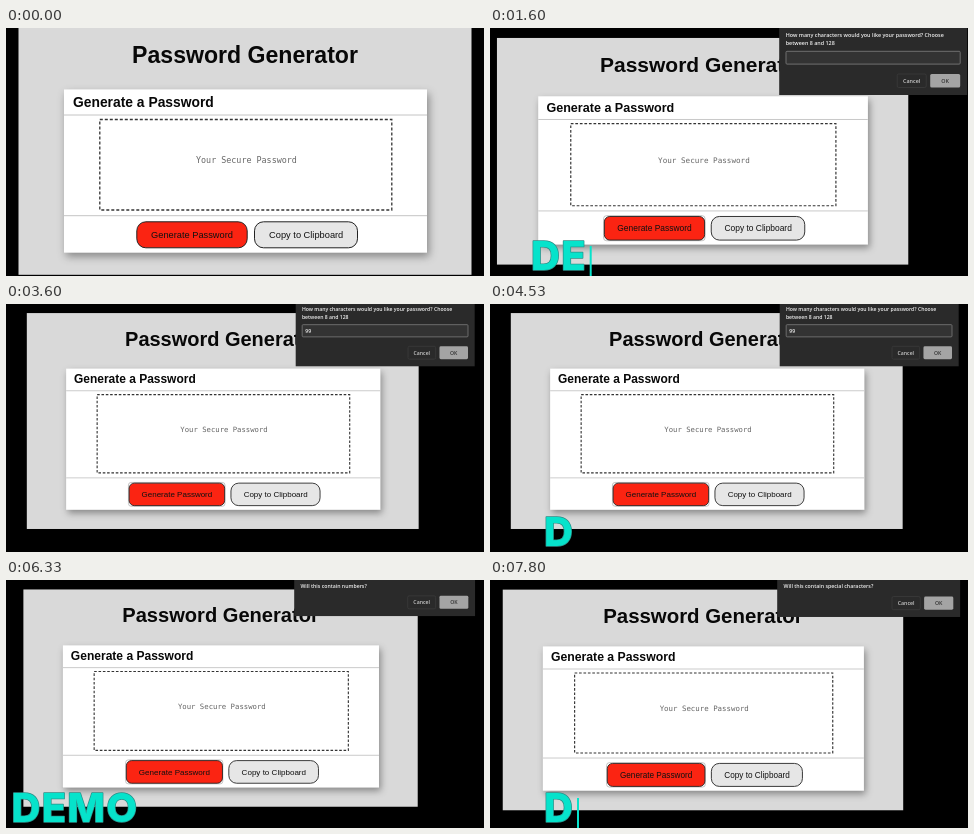
Animation of 478 by 248 pixels, one loop 8 s. Source, as an HTML page:

```html
<!DOCTYPE html>
<html lang="en">
<head>
<meta charset="utf-8">
<title>Password Generator demo</title>
<style>
  html, body { margin: 0; width: 100%; height: 100%; overflow: hidden; background: #000; }
  svg { display: block; width: 478px; height: 248px; }
  .sans { font-family: "Liberation Sans", Arial, sans-serif; }
  .mono { font-family: "DejaVu Sans Mono", monospace; }
  .ui { font: 600 5.4px "Open Sans", sans-serif; }
  .bold { font-weight: 700; }
  .demo { font: 800 40px Inter, sans-serif; letter-spacing: 1.3px; paint-order: stroke; }
</style>
</head>
<body>
<svg viewBox="0 0 478 248" xmlns="http://www.w3.org/2000/svg">
  <defs>
    <filter id="shadow" x="-10%" y="-10%" width="125%" height="130%">
      <feDropShadow dx="2" dy="4" stdDeviation="4" flood-color="#000" flood-opacity=".38"/>
    </filter>
  </defs>
  <rect width="478" height="248" fill="#000"/>

  <g id="page" class="sans">
    <rect x="12.5" y="-2.8" width="453" height="249.6" fill="#d9d9d9"/>
    <text class="bold" x="239" y="35" font-size="23.1" text-anchor="middle" fill="#080808">Password Generator</text>
    <rect x="58" y="61.5" width="363" height="163" fill="#fff" filter="url(#shadow)"/>
    <path d="M58 87H421M58 187.7H421" stroke="#c4c4c4"/>
    <text class="bold" x="67" y="78.5" font-size="13.85" fill="#080808">Generate a Password</text>
    <rect x="93.8" y="91.5" width="292" height="90.5" fill="none" stroke="#333" stroke-width="1.3" stroke-dasharray="3 2"/>
    <text class="mono" x="190" y="134.8" font-size="8.4" fill="#666">Your Secure Password</text>
    <rect id="focus" x="130" y="193" width="111.6" height="27.5" rx="3" fill="none" stroke="#aaa" stroke-width=".8"/>
    <g stroke="#222">
      <rect id="generate" x="130.8" y="193.8" width="110.4" height="26" fill="#fb2412"/>
      <rect x="248.5" y="193.8" width="103" height="26" rx="9" fill="#e6e6e6"/>
    </g>
    <g font-size="9.27" text-anchor="middle" fill="#111">
      <text x="186" y="210">Generate Password</text>
      <text x="300.2" y="210">Copy to Clipboard</text>
    </g>
  </g>

  <g id="dialog" class="ui" fill="#f0f0f0">
    <rect id="panel" width="188" fill="#2a2a2a"/>
    <text id="line1" x="6.5" y="8.5"/>
    <text id="line2" x="6.5" y="17.2"/>
    <g id="field">
      <rect x="6.8" y="23.3" width="174.2" height="12.8" rx="1" fill="#333" stroke="#777" stroke-width=".9"/>
      <text id="entry" x="10" y="32"/>
    </g>
    <g id="actions" text-anchor="middle">
      <rect x="118" y="0" width="29" height="13.5" rx="1.5" fill="none" stroke="#3c3c3c" stroke-width=".8"/>
      <rect x="151" y="0" width="30" height="13.5" rx="1.5" fill="#a4a4a4"/>
      <text x="132.5" y="8.7" fill="#ccc">Cancel</text>
      <text x="166" y="8.7" fill="#333">OK</text>
    </g>
  </g>

  <g fill="#06e3cb">
    <text id="word" class="demo" x="69" y="242.3" text-anchor="middle" stroke="#2b8f88" stroke-width="1.4" stroke-linejoin="round"/>
    <rect id="caret" y="218" width="2" height="30"/>
  </g>
</svg>
<script>
const $ = id => document.getElementById(id);
const LOOP = 8000, SCENE = 1600, CYCLE = 3600, BLINK = 450;

const lengthPrompt = ["How many characters would you like your password? Choose", "between 8 and 128"];

// page / dialog: [x, y, scale]; height is the dialog's unscaled height
const scenes = [
  { page: [0, 0, 1] },
  { page: [-4.4, 12.5, .908], dialog: [289.2, 0, 1], height: 67, lines: lengthPrompt, entry: "" },
  { page: [10, 11.5, .865], dialog: [289.7, -1.5, .952], height: 67, lines: lengthPrompt, entry: "99" },
  { page: [6.5, 11.9, .8705], dialog: [288.2, 0, .962], height: 37.5, lines: ["Will this contain numbers?"] },
  { page: [1.7, 12.1, .884], dialog: [287.2, 0, .973], height: 38, lines: ["Will this contain special characters?"] }
];

const typing = [
  { at: 0, text: "D", caret: 87 },
  { at: 730, text: "DE", caret: 99.7 },
  { at: 1270, text: "DEM", caret: 117 },
  { at: 1800, text: "DEMO", caret: 134 },
  { at: 3130, text: "" }
];

const show = (el, on) => el.setAttribute("display", on ? "inline" : "none");
const place = (el, [x, y, s]) => el.setAttribute("transform", `translate(${x} ${y}) scale(${s})`);

function drawScene({ page, dialog, height, lines, entry }) {
  place($("page"), page);
  show($("focus"), dialog);
  $("generate").setAttribute("rx", dialog ? 6 : 9);
  show($("dialog"), dialog);
  if (!dialog) return;
  place($("dialog"), dialog);
  $("panel").setAttribute("height", height);
  $("line1").textContent = lines[0];
  $("line2").textContent = lines[1] || "";
  show($("field"), entry !== undefined);
  $("entry").textContent = entry || "";
  place($("actions"), [0, height - 21, 1]);
}

function drawWord(phase) {
  const { text, caret } = typing.filter(step => phase >= step.at).pop();
  $("word").textContent = text;
  show($("caret"), text && Math.floor(phase / BLINK) % 2 === 0);
  if (text) $("caret").setAttribute("x", caret);
}

function render(now) {
  const t = now % LOOP;
  drawScene(scenes[Math.floor(t / SCENE)]);
  drawWord((t + 3130) % CYCLE);
}

const start = performance.now();
function tick() {
  render(performance.now() - start);
  requestAnimationFrame(tick);
}
tick();
</script>
</body>
</html>
```
